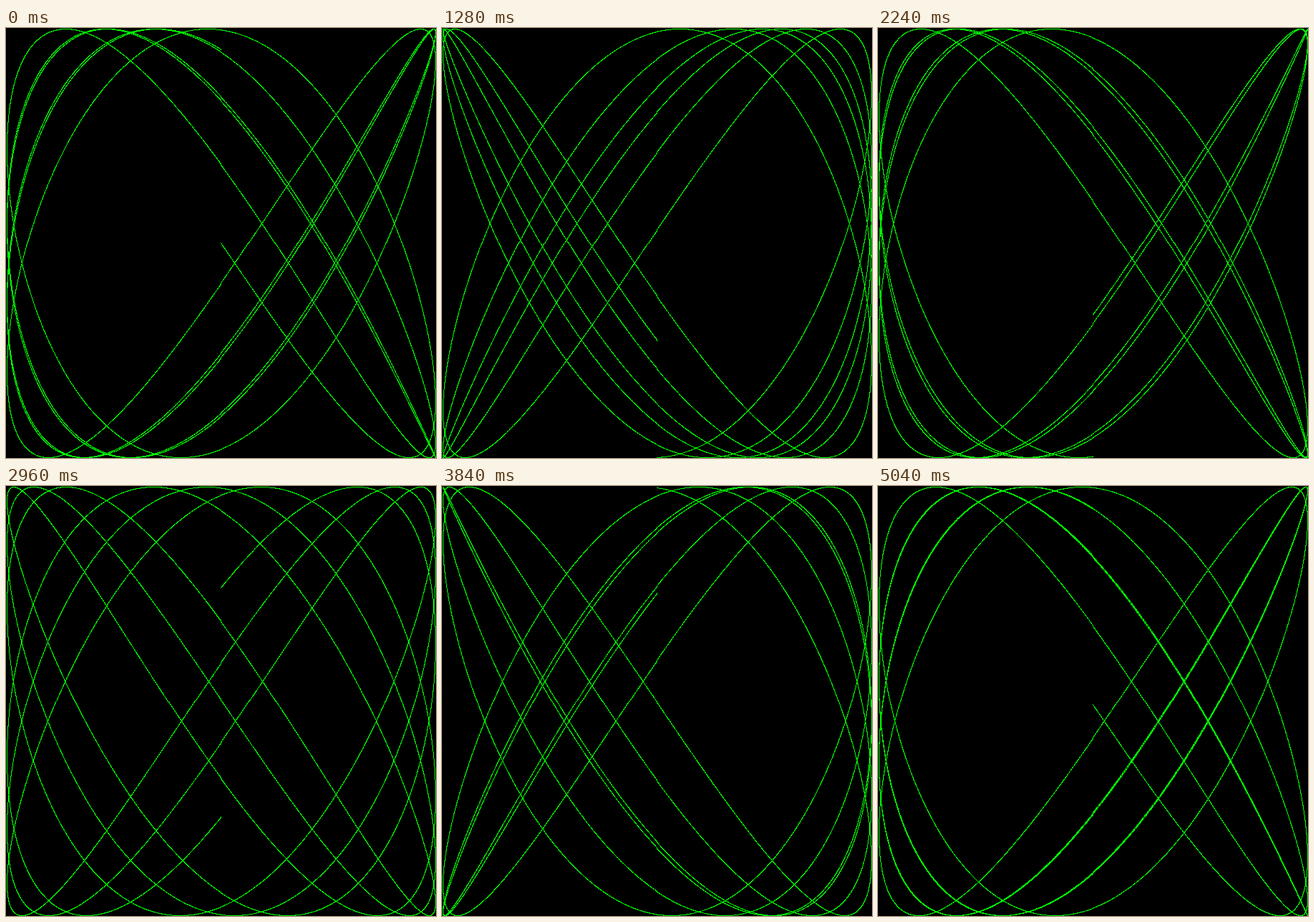
Animation, 601 px wide and 601 px high, one loop 5.12 s. Source, as an HTML page with a canvas:

```html
<!DOCTYPE html>
<html lang="en">
<head>
<meta charset="utf-8">
<title>Lissajous</title>
<style>
  html, body { margin: 0; width: 100%; height: 100%; overflow: hidden; background: #000; }
  canvas { display: block; }
</style>
</head>
<body>
<canvas width="601" height="601"></canvas>
<script>
const RADIUS = 300, SIZE = 2 * RADIUS + 1;
const CYCLES = 6, RESOLUTION = 0.001, FREQUENCY = 1.470105;
const STEPS = 64, STEP_MS = 80, PHASE_STEP = 0.1;

const ctx = document.querySelector('canvas').getContext('2d');
const image = ctx.createImageData(SIZE, SIZE);
const pixels = new Uint32Array(image.data.buffer);
const BLACK = 0xff000000, GREEN = 0xff00ff00; // ABGR

// Truncating toward zero leaves a one-pixel kink along the centre lines.
const toPixel = v => RADIUS + Math.trunc(v * RADIUS + 0.5);

function draw(phase) {
  pixels.fill(BLACK);
  for (let t = 0; t < CYCLES * 2 * Math.PI; t += RESOLUTION) {
    const x = toPixel(Math.sin(t));
    const y = toPixel(Math.sin(t * FREQUENCY + phase));
    pixels[y * SIZE + x] = GREEN;
  }
  ctx.putImageData(image, 0, 0);
}

let shown = -1;
const start = performance.now();

function tick() {
  const step = Math.floor((performance.now() - start) / STEP_MS) % STEPS;
  if (step !== shown) draw((shown = step) * PHASE_STEP);
  requestAnimationFrame(tick);
}
tick();
</script>
</body>
</html>
```
